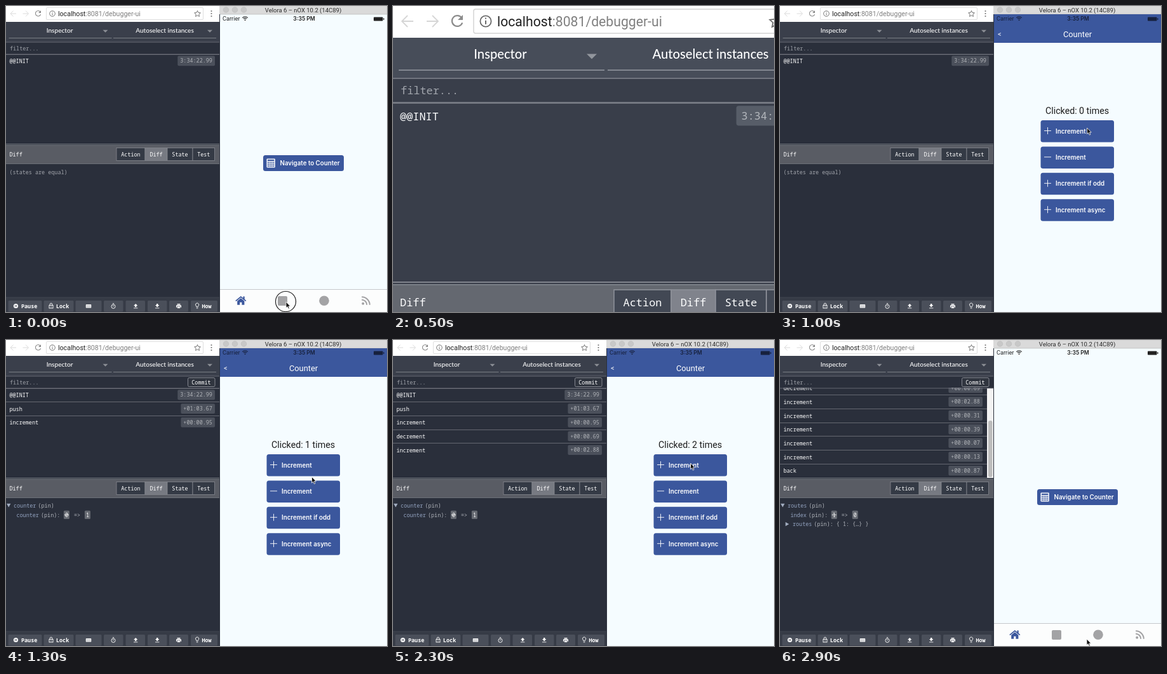
Recreate the animation shown at these times as an HTML page. Size 600x482 px, loop 3 s.

```html
<!DOCTYPE html>
<html lang="en">
<head>
<meta charset="utf-8">
<title>Debugger demo</title>
<style>
  html, body { margin: 0; width: 100%; height: 100%; overflow: hidden; background: #2a2f3b; }
  svg { display: block; width: 600px; height: 482px; }
  .mono { font: 8.45px "Noto Sans Mono", "DejaVu Sans Mono", monospace; }
  .head { font: 500 10.1px Lato, sans-serif; }
  .ui { font-family: Roboto, sans-serif; }
  .label { font: 600 9.75px Inter, sans-serif; }
</style>
</head>
<body>
<svg id="stage" xmlns="http://www.w3.org/2000/svg"></svg>
<script>
const LOOP = 3000, STEP = 100, CHAR = 5.07, ROW = 21.7;
const BLUE = '#3b579d', GREY = '#a3a3a5', LINE = '#74777f';
const stage = document.getElementById('stage');

// appears at, action, time stamp, changed state key, before, after
const LOG = [
  [0, '@@INIT', '3:34:22.99'],
  [1100, 'push', '+01:03.67', 'routes', 0, 1],
  [1300, 'increment', '+00:00.95', 'counter', 0, 1],
  [1500, 'decrement', '+00:00.69', 'counter', 1, 0],
  [2300, 'increment', '+00:02.88', 'counter', 0, 1],
  [2400, 'increment', '+00:00.31', 'counter', 1, 2],
  [2500, 'increment', '+00:00.39', 'counter', 2, 3],
  [2500, 'increment', '+00:00.07', 'counter', 3, 4],
  [2500, 'increment', '+00:00.13', 'counter', 4, 5],
  [2800, 'back', '+00:00.87', 'routes', 1, 0]
];
const COUNTS = [[0, 0], [1200, 1], [1400, 0], [2200, 1], [2300, 2], [2400, 3], [2500, 5]];
const POINTER = [
  [0, 441, 466], [300, 441, 466], [700, 439.5, 321], [800, 468, 249], [900, 475, 238],
  [1000, 483.5, 192], [1200, 483, 193], [1400, 480, 238], [1700, 475, 318], [2000, 475, 318],
  [2200, 468.5, 194], [2500, 468.5, 194], [2700, 346, 44], [2900, 483, 471], [3000, 483, 471]
];

const rect = (x, y, w, h, fill, more = '') =>
  `<rect x="${x}" y="${y}" width="${w}" height="${h}" fill="${fill}" ${more}/>`;
const text = (x, y, s, fill = '#fff', cls = 'mono', more = '') =>
  `<text x="${x}" y="${y}" fill="${fill}" class="${cls}" ${more}>${s}</text>`;
const centered = (x, y, s, fill, cls, more = '') =>
  text(x, y, s, fill, cls, 'text-anchor="middle" ' + more);
const path = (d, fill = 'none', stroke = 'none', w = 1, more = '') =>
  `<path d="${d}" fill="${fill}" stroke="${stroke}" stroke-width="${w}" ${more}/>`;
const circle = (x, y, r, fill = 'none', stroke = 'none', w = 1) =>
  `<circle cx="${x}" cy="${y}" r="${r}" fill="${fill}" stroke="${stroke}" stroke-width="${w}"/>`;
const hline = (x, y, w, color = LINE) => rect(x, y + .1, w, .8, color);

function browserBar() {
  const arrow = (x, dir) => path(`M${x + 4.5 * dir} 12H${x - 4 * dir}m${4 * dir} -4.5l${-4.5 * dir} 4.5l${4.5 * dir} 4.5`, 'none', '#d6d6d6', .9);
  return rect(0, 0, 336, 25, '#fff') + arrow(11.5, 1) + arrow(31, -1)
    + path('M54 9.2a4.2 4.2 0 1 0 .6 4', 'none', '#8c8c8c', 1.1) + path('M55 7v4h-4z', '#8c8c8c')
    + rect(63.5, 2.5, 247, 19, '#fff', 'rx="1.5" stroke="#d2d2d2" stroke-width=".7"')
    + circle(73, 12, 4.3, 'none', '#6a6a6a', .9) + path('M73 11.4v3M73 9.3v1', 'none', '#6a6a6a')
    + text(82, 15.8, '<tspan fill="#222">localhost</tspan>:8081/debugger-ui', '#808080', 'ui', 'font-size="10.6"')
    + path('M301.5 7.3l1.4 3.1 3.4.4-2.5 2.3.7 3.4-3-1.7-3 1.7.7-3.4-2.5-2.3 3.4-.4z', 'none', '#6a6a6a', .9)
    + [8, 12, 16].map(y => circle(323.5, y, 1.1, '#777')).join('');
}

function menus() {
  const menu = (x, label, mid) => centered(mid, 41.6, label, '#fff', 'head')
    + path(`M${x + 148} 37.8h8l-4 4z`, '#8b8e95') + hline(x, 50, 162, '#8b8e95');
  return rect(0, 25, 336, 32, '#3a3f4b') + menu(4.5, 'Inspector', 84.5)
    + menu(169, 'Autoselect instances', 250) + hline(0, 56.5, 336)
    + text(6, 69.5, 'filter...', '#9c9fa6');
}

function actionList(rows) {
  const scroll = Math.max(0, rows.length * ROW - 141);
  const right = scroll ? 319 : 329;
  const items = rows.map(([, name, stamp], i) => {
    const y = 76 + i * ROW - scroll, w = stamp.length * CHAR + 8;
    return hline(0, Math.round(y - .5), 336) + text(5.5, y + 14, name)
      + rect(right - w, y + 2.6, w, 15.6, '#4b505b', 'rx="2"') + text(right - w + 4, y + 13.4, stamp, '#b0b3b8');
  }).join('');
  const bar = scroll ? rect(326, 76, 10, 141, '#f3f3f3') + rect(328, 127, 6.5, 89, '#bdbdbd', 'rx="3"') : '';
  const commit = rows.length > 1
    ? rect(286.5, 59.5, 42.5, 14, '#30353f', 'rx="2" stroke="#858890"') + centered(307.5, 69.6, 'Commit') : '';
  return `<g clip-path="url(#list)">${items}${bar}</g>` + hline(0, 75.5, 336) + commit;
}

function diffPane([, , , key, from, to]) {
  const tabs = [['Action', 174, 45], ['Diff', 219, 35], ['State', 254, 40], ['Test', 294, 34.5]];
  const bar = rect(0, 219, 336, 29.5, '#595c64') + hline(0, 217, 336, '#8b8e95')
    + hline(0, 219, 336, '#777a82') + hline(0, 248, 336, '#777a82')
    + text(5.5, 236.6, 'Diff')
    + tabs.map(([s, x, w]) => rect(x, 223.5, w, 20, s === 'Diff' ? '#777a82' : '#343a45', 'stroke="#858890" stroke-width=".8"')
      + centered(x + w / 2, 236.6, s)).join('');
  if (!key) return bar + text(5.5, 264.6, '(states are equal)', '#a2a5ac');

  const field = (x, y, name, tail) => text(x, y, name, '#93a3c0')
    + text(x + name.length * CHAR + 3, y, tail, '#b0b4bb');
  const value = (x, v, struck) => rect(x, 268.8, 9, 13.2, '#666a72', 'rx="1.5"') + text(x + 2, 278.6, v)
    + (struck ? hline(x + 1, 275, 7, '#fff') : '');
  const name = key === 'routes' ? 'index' : key;
  const x = 25 + (name.length + 6) * CHAR;
  return bar + path('M1 257.8h6.4l-3.2 5.6z', '#a2adc0') + field(12, 264, key, '(pin)')
    + field(16.5, 278.6, name, '(pin):') + value(x, from, true)
    + text(x + 16, 278.6, '=&gt;', '#b0b4bb') + value(x + 33, to)
    + (key === 'routes' ? path('M8.6 286.8v6.4l5.6-3.2z', '#a2adc0') + field(20, 293.4, key, '(pin): { 1: {…} }') : '');
}

function toolbar() {
  const slots = [[3.5, 53], [59.5, 47], [109.5, 41], [154, 30.5], [188.5, 30.5], [223, 30.5], [257, 30], [291, 42]];
  const bold = 'style="font-weight:700"';
  const white = (d, w = 1) => path(d, 'none', '#fff', w);
  return rect(0, 459, 336, 23, '#363b46') + hline(0, 458.5, 336, '#444954')
    + slots.map(([x, w]) => rect(x, 464, w, 17.5, '#4a4f5a', 'rx="1.5"')).join('')
    + circle(15.5, 472.5, 3.6, '#fff') + path('M14.4 471v3M16.6 471v3', 'none', '#4a4f5a')
    + text(24, 475.6, 'Pause', '#fff', 'mono', bold)
    + rect(68, 471.5, 6, 4.5, 'none', 'stroke="#fff" stroke-width=".9"') + white('M69.2 471.5v-1.6a1.8 1.8 0 0 1 3.6 0v1.6M71 473v1.5', .9)
    + text(79, 475.6, 'Lock', '#fff', 'mono', bold)
    + rect(125.8, 470, 8.4, 5.6, '#fff', 'rx=".7"') + path('M127 471.8h6M127 473.8h6', 'none', '#4a4f5a', .8, 'stroke-dasharray="1 .7"')
    + circle(169, 473.3, 3.1, 'none', '#fff', .9) + white('M169 471.6v2M167.8 468.6h2.4', .9)
    + path('M201 472.3l3.2-3.4 3.2 3.4h-2v2h-2.4v-2z', '#fff') + hline(201, 475.4, 6.4, '#fff')
    + path('M235 471l3.2 3.4 3.2-3.4h-2v-2h-2.4v2z', '#fff') + hline(235, 475.4, 6.4, '#fff')
    + rect(268, 471.3, 8, 3.6, '#fff', 'rx=".6"') + rect(269.6, 469, 4.8, 1.6, '#fff')
    + rect(269.6, 473.6, 4.8, 2.6, '#fff', 'stroke="#4a4f5a" stroke-width=".6"')
    + white('M299.8 474v-1.2a2.6 2.6 0 1 1 2.6 0V474zM299.8 476h2.6', .9)
    + text(308.5, 475.6, 'How', '#fff', 'mono', bold);
}

function statusBar(ink) {
  const wifi = r => path(`M${376.5 - r * .75} ${22.8 - r * .75}a${r} ${r} 0 0 1 ${r * 1.5} 0`, 'none', ink, 1.1);
  return text(341, 23.4, 'Carrier', ink, 'ui', 'font-size="9.2"') + wifi(5.6) + wifi(3.4) + circle(376.5, 22, 1, ink)
    + centered(469.5, 23.4, '3:35 PM', ink, 'label', 'style="font-size:8.6px"')
    + rect(579, 17.5, 14.5, 6, ink, 'rx="1"') + rect(594.2, 19.2, 1.3, 2.6, ink);
}

function homeScreen() {
  const x = 410.5, y = 240.5;
  let keys = '';
  for (let i = 0; i < 12; i++) keys += rect(x + 1.5 + i % 4 * 2.8, y + 4.9 + (i / 4 | 0) * 2.9, 1.9, 1.9, BLUE);
  return statusBar('#222')
    + rect(405, 235, 127, 25, BLUE, 'rx="3.5"') + rect(x, y, 13.3, 14, '#fff', 'rx="1"')
    + rect(x + 1.5, y + 1.4, 10.3, 2.2, BLUE) + keys
    + text(431.5, 250.8, 'Navigate to Counter', '#fff', 'label')
    + rect(337, 446.5, 263, 36, '#fcfdfd') + hline(337, 446, 263, '#b9bcbe')
    + path('M361.8 464.6l8-6.6 8 6.6', 'none', BLUE, 1.7) + rect(373.4, 457.5, 2.3, 5, BLUE)
    + path('M364.2 464.8l5.6-4.6 5.6 4.6v6h-4v-4h-3.2v4h-4z', BLUE)
    + rect(428, 457, 15, 15, GREY, 'rx="2"') + circle(501, 464.3, 7.8, GREY)
    + circle(562.2, 468.8, 2, GREY) + path('M560.2 462.7a8 8 0 0 1 8 8M560.2 458.2a12.6 12.6 0 0 1 12.6 12.6', 'none', GREY, 2.1);
}

function counterScreen(count) {
  const labels = ['Increment', 'Increment', 'Increment if odd', 'Increment async'];
  return rect(337, 13, 263, 45, BLUE) + statusBar('#17213d')
    + text(343, 47.6, '&lt;', '#fff', 'ui', 'font-size="11"')
    + centered(468.5, 48.6, 'Counter', '#fff', 'ui', 'font-size="12.8"')
    + centered(468, 170, `Clicked: ${count} times`, '#1c1c1c', 'ui', 'font-size="14.2"')
    + labels.map((s, i) => {
      const y = 180 + i * 41.4;
      return rect(410.5, y, 115.5, 34.5, BLUE, 'rx="3.5"')
        + path(`M416 ${y + 16.5}h11` + (i === 1 ? '' : `m-5.5 -5.5v11`), 'none', '#fff', .9)
        + text(434, y + 20.6, s, '#fff', 'label');
    }).join('');
}

function pointer(t) {
  const i = POINTER.findIndex(p => p[0] > t);
  const [a, b] = [POINTER[i - 1], POINTER[i]];
  const k = (t - a[0]) / (b[0] - a[0]);
  const [x, y] = [1, 2].map(n => a[n] + (b[n] - a[n]) * k);
  return path(`M${x} ${y}v9.6l2.2-2 1.5 3.5 1.7-.7-1.5-3.4h2.9z`, '#111', '#fff', .8);
}

function draw(t) {
  const rows = LOG.filter(r => r[0] <= t);
  const count = COUNTS.filter(c => c[0] <= t).pop()[1];
  const closeUp = t >= 500 && t < 700;
  stage.setAttribute('viewBox', closeUp ? '0 0 300 241' : '0 0 600 482');
  stage.innerHTML = '<clipPath id="list"><rect y="75" width="336" height="142"/></clipPath>'
    + rect(0, 25, 337, 457, '#2a2f3b') + browserBar() + menus() + actionList(rows)
    + diffPane(rows[rows.length - 1]) + toolbar()
    + (closeUp ? rect(0, 25, 336, 457, '#e0f0ff', 'opacity=".08"') : '')
    + rect(337, 0, 263, 482, '#f5fcff') + rect(336, 0, 264, 13, '#dadada') + hline(337, 12.5, 263, '#bcbcbc')
    + [346.5, 360.5, 374.5].map(x => circle(x, 6, 4.3, '#c8c8c8', '#bababa', .6)).join('')
    + centered(468, 9.6, 'Velora 6 – nOX 10.2 (14C89)', '#2c2c2c', 'ui', 'font-size="9.5"')
    + (t >= 900 && t < 2700 ? counterScreen(count) : homeScreen())
    + (t < 100 ? circle(440.5, 465.5, 16, 'none', '#222', 1.2) : '') + pointer(t);
}

let shown = -1;
function tick() {
  const t = Math.floor(performance.now() % LOOP / STEP) * STEP;
  if (t !== shown) draw(shown = t);
  requestAnimationFrame(tick);
}
tick();
</script>
</body>
</html>
```
